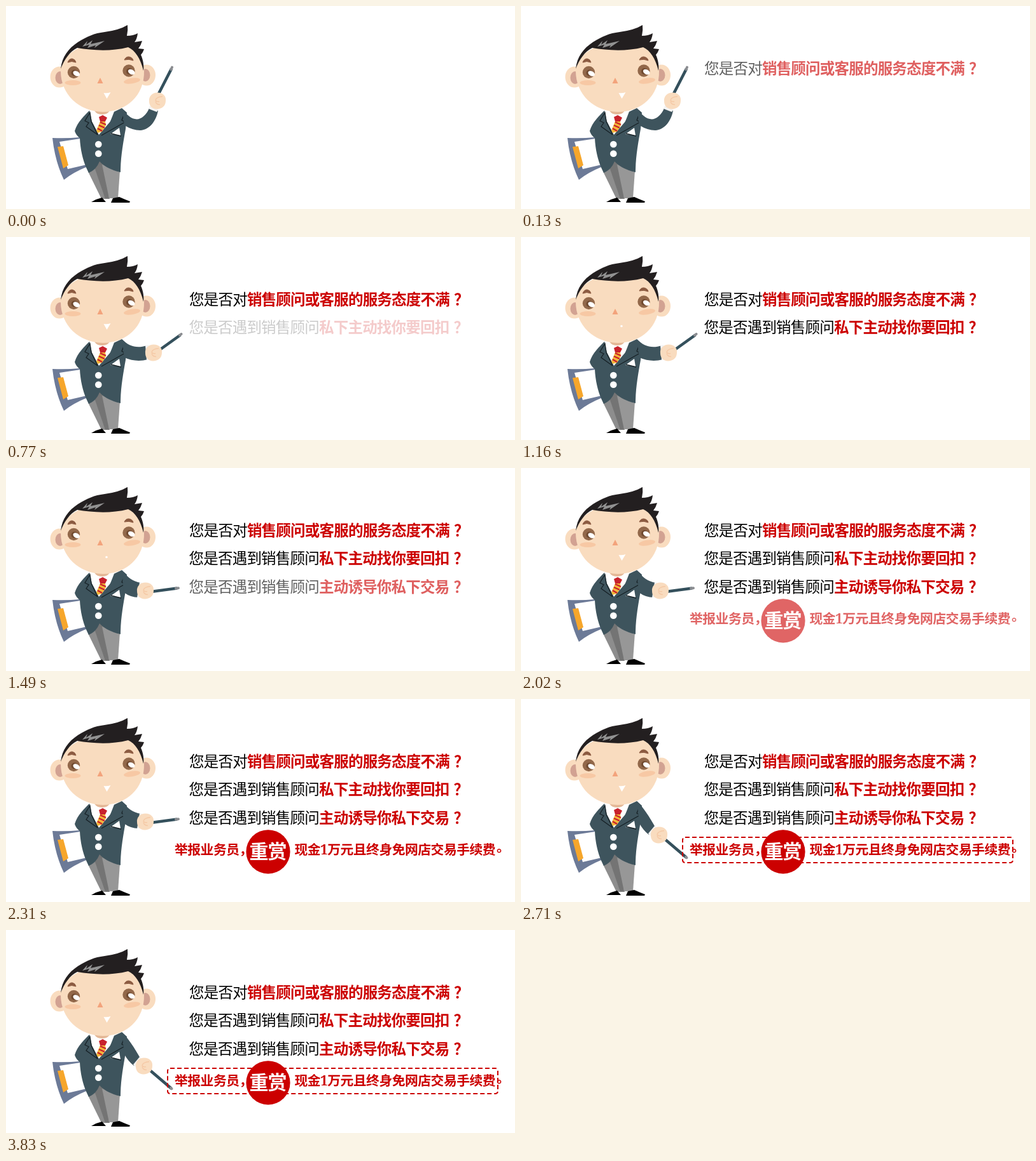
Animation of 800 by 320 pixels, one loop 4960 ms. Source, as an HTML page:

```html
<!DOCTYPE html>
<html lang="zh-CN">
<head>
<meta charset="utf-8">
<title>服务反馈</title>
<style>
html, body { margin: 0; width: 100%; height: 100%; overflow: hidden; background: #fff; }
svg { display: block; width: 800px; height: 320px; }
text { font-family: "Noto Sans CJK SC", "Noto Sans CJK", sans-serif; }
.ask { font-size: 23.5px; letter-spacing: -.78px; }
.ask tspan { font-weight: 700; fill: #c00; }
.offer { font-size: 20.8px; font-weight: 700; letter-spacing: -.5px; fill: #c00; }
.offer .num { font-family: "Noto Serif", serif; }
.big { font-size: 30px; font-weight: 900; letter-spacing: -1px; fill: #fff; }

.skin { fill: #f9dcbf; }
.suit { fill: #3e545d; }
.ink { fill: #231f20; }
.white { fill: #fff; }
.cuff { fill: #f4f4f4; }
.pen { stroke: #34505c; stroke-width: 4.6; }
.tip { stroke: #8b8d91; stroke-width: 4; stroke-linecap: round; }

.t { animation: 4960ms step-end infinite; }
.l1 { animation-name: l1; }
.l2 { animation-name: l2; }
.l3 { animation-name: l3; }
.l4 { animation-name: l4; }
.dash { animation-name: dash; }
.up { animation-name: up; }
.high { animation-name: high; }
.level { animation-name: level; }
.low { animation-name: low; }
.open { animation-name: open; }
.shut { animation-name: shut; }

/* fades run in a few hard steps */
@keyframes l1 { 0% { opacity: 0 } 1.41% { opacity: .2 } 2.01% { opacity: .4 } 2.62% { opacity: .62 } 3.22%, to { opacity: 1 } }
@keyframes l2 { 0% { opacity: 0 } 15.52% { opacity: .2 } 16.12% { opacity: .4 } 16.73% { opacity: .62 } 17.53%, to { opacity: 1 } }
@keyframes l3 { 0% { opacity: 0 } 28.82% { opacity: .2 } 29.43% { opacity: .4 } 30.04% { opacity: .62 } 30.64%, to { opacity: 1 } }
@keyframes l4 { 0% { opacity: 0 } 39.51% { opacity: .2 } 40.12% { opacity: .4 } 40.72% { opacity: .6 } 41.33% { opacity: .75 } 41.93% { opacity: .9 } 42.53%, to { opacity: 1 } }
@keyframes dash { 0% { opacity: 0 } 52.62% { opacity: .2 } 53.22% { opacity: .4 } 53.83% { opacity: .62 } 54.63%, to { opacity: 1 } }

@keyframes up { 0% { opacity: 1 } 14.91%, to { opacity: 0 } }
@keyframes high { 0% { opacity: 0 } 14.91% { opacity: 1 } 28.82%, to { opacity: 0 } }
@keyframes level { 0% { opacity: 0 } 28.82% { opacity: 1 } 52.62%, to { opacity: 0 } }
@keyframes low { 0% { opacity: 0 } 52.62%, to { opacity: 1 } }

@keyframes open {
  0%, 6.65%, 13.5%, 19.95%, 26.81%, 33.26%, 40.12%, 46.57%, 53.22%, 60.08%, 66.93%, 73.79%, to { opacity: 1 }
  3.22%, 10.08%, 16.73%, 23.38%, 30.04%, 36.69%, 43.14%, 50%, 56.65%, 63.5%, 70.36% { opacity: 0 }
}
@keyframes shut {
  0%, 6.65%, 13.5%, 19.95%, 26.81%, 33.26%, 40.12%, 46.57%, 53.22%, 60.08%, 66.93%, 73.79%, to { opacity: 0 }
  3.22%, 10.08%, 16.73%, 23.38%, 30.04%, 36.69%, 43.14%, 50%, 56.65%, 63.5%, 70.36% { opacity: 1 }
}
</style>
</head>
<body>
<svg viewBox="0 0 800 320">
  <defs>
    <g id="hand">
      <path class="skin" d="M-13 1C-14-7-8-13 0-13C9-13 14-7 13 0C13 8 7 13-1 13C-8 13-13 8-13 1Z"/>
      <path d="M8-7Q-2-6-3-1Q-2 2 3 1M-3 1Q-2 6 4 6" fill="none" stroke="#f5c9a6" stroke-width="1.3"/>
    </g>
    <g id="eye">
      <circle r="9.7" fill="#92684a"/>
      <circle cx="1" cy="1" r="5" fill="#704a30"/>
      <ellipse class="white" cx="4.2" cy="2" rx="5.6" ry="3.7" transform="rotate(28 4.2 2)"/>
    </g>
  </defs>

  <g id="board">
    <path d="M73 208Q95 209 116 207L131 252Q107 261 91 274Q77 245 73 208Z" fill="#6c7a97"/>
    <path class="white" d="M84 214L117 209L127 250L97 257Z"/>
    <path d="M81 222L90 221L98 251L90 256Z" fill="#f6a62b"/>
  </g>

  <g id="legs">
    <path d="M129 261L147 244L165 254L163 304H150Z" fill="#8d8d8d"/>
    <path d="M139 254L147 244L156 254L162 304H156Z" fill="#747474"/>
    <path d="M151 250L179 260L176 303H162Z" fill="#979797"/>
    <path d="M134 309Q142 304 151 302L157 309Z"/>
    <path d="M165 310L168 303L178 301Q187 305 195 308L194 310Z"/>
  </g>

  <g id="jacket">
    <path class="suit" d="M131 165C124 172 112 183 108 197Q110 204 116 208C117 229 122 248 130 263Q142 258 147 245Q158 257 180 262C180 239 184 216 188 194L190 168L182 161L167 168Z"/>
    <path class="white" d="M131 164H171L164 182L146 203L135 182Z"/>
    <path d="M138 160H164Q163 171 151 171Q139 171 138 160Z" fill="#e4b897"/>
    <path d="M146 175L152 172L159 176L156 182H148Z" fill="#c8222c"/>
    <path d="M148 182H156L157 188L151 198L144 200L142 196Z" fill="#f4b53a"/>
    <path d="M148 183L157 187M146 188L155 192M144 193L151 197" stroke="#c8222c" stroke-width="2.3"/>
    <path class="suit" d="M131 166L124 181L130 184L126 190L145 205L134 182Z"/>
    <path class="suit" d="M171 168L186 168L183 181L187 184L147 207L162 186Z"/>
    <path d="M132 168L124 181L130 184L126 190L144 203L134 182ZM187 167L182 180L187 183L150 204" fill="none" stroke="#172126" stroke-width="1.3"/>
    <path class="white" d="M164 202L178 192L180 204Z"/>
    <path d="M165 201L181 205" stroke="#172126" stroke-width="1.3"/>
    <circle class="white" cx="145.3" cy="218" r="5.3"/>
    <circle class="white" cx="145.3" cy="232.8" r="5.3"/>
  </g>

  <g id="head">
    <ellipse class="skin" cx="84" cy="112" rx="14.5" ry="16.5"/>
    <ellipse cx="85" cy="113" rx="7.5" ry="10" fill="#d2a292"/>
    <ellipse class="skin" cx="221" cy="109" rx="14" ry="16.5"/>
    <ellipse cx="219" cy="109" rx="7.5" ry="10" fill="#d2a292"/>
    <path class="skin" d="M86 102C88 78 112 60 151 58C192 56 215 74 217 102C218 142 188 167 152 167C115 166 86 140 86 102Z"/>
    <path class="ink" d="M86 99C88 80 98 67 113 57C128 48 138 43 155 41Q178 38 191 30Q192 38 190 47Q200 47 207 43Q206 52 202 57L214 55Q212 62 208 67L217 68Q215 74 212 77C216 86 217 95 216 102C211 82 203 70 192 65C165 72 135 70 112 66C100 72 92 84 86 99Z"/>
    <path d="M120 64L128 55L126 61L136 54L133 60L155 55L139 66L141 62L128 66L131 61Z" fill="#929292"/>
    <path d="M97 89Q99 83 104 83Q109 84 110 89Q103 86 97 89ZM186 85Q188 80 193 80Q199 81 200 86Q193 83 186 85Z" fill="#8c5b41" stroke="#8c5b41"/>
    <use href="#eye" x="106.5" y="104.5"/>
    <use href="#eye" x="193" y="102"/>
    <ellipse cx="105" cy="121" rx="12.5" ry="4" fill="#f7c8a4"/>
    <ellipse cx="198" cy="118" rx="13" ry="4.3" fill="#f7c8a4" transform="rotate(-9 198 118)"/>
    <path d="M148 113L152.5 122H143.5Z" fill="#f3a37c"/>
    <path class="white t open" d="M153.5 137Q159 138 164.5 136L158.5 146Z"/>
    <circle class="white t shut" cx="158" cy="140.5" r="1.7"/>
  </g>

  <g class="t up">
    <path class="pen" d="M239 140L260 99"/><path class="tip" d="M259.5 100L261 96.5"/>
    <path class="suit" d="M182 161C192 176 205 184 216 174Q222 169 225 161L239 165C236 181 226 195 211 196Q199 196 186 188Z"/>
    <path class="cuff" d="M226 157L240 162L237 167L224 162Z"/>
    <use href="#hand" x="238" y="149.5"/>
  </g>
  <g class="t high">
    <path class="pen" d="M240 179L274 154.5"/><path class="tip" d="M273 155L275.5 153"/>
    <path class="suit" d="M182 161C193 173 207 176 221 171L223 193Q204 198 186 190Z"/>
    <path class="cuff" d="M219 171L224 170L226 193L221 194Z"/>
    <use href="#hand" x="232" y="182.5"/>
  </g>
  <g class="t level">
    <path class="pen" d="M228 195L269 189.5"/><path class="tip" d="M267 189.8L271 189.2"/>
    <path class="suit" d="M182 161C191 172 199 179 212 181L208 204Q196 204 185 196Z"/>
    <path class="cuff" d="M210 180L214 181L210 204L206 204Z"/>
    <use href="#hand" x="219" y="193.5"/>
  </g>
  <g class="t low">
    <path class="pen" d="M225 220L260 250"/><path class="tip" d="M259 249L260.5 250.3"/>
    <path class="suit" d="M182 161C191 169 202 186 211 202L201 214Q192 207 186 196Z"/>
    <path class="cuff" d="M210 200L214 204L203 216L200 212Z"/>
    <use href="#hand" x="217" y="214.5"/>
  </g>

  <text class="ask t l1" x="288" y="106.8">您是否对<tspan>销售顾问或客服的服务态度不满<tspan dx="7">？</tspan></tspan></text>
  <text class="ask t l2" x="287.5" y="150.7">您是否遇到销售顾问<tspan>私下主动找你要回扣<tspan dx="7">？</tspan></tspan></text>
  <text class="ask t l3" x="287.5" y="196">您是否遇到销售顾问<tspan>主动诱导你私下交易<tspan dx="7">？</tspan></tspan></text>

  <rect class="t dash" x="254" y="218" width="519" height="40" rx="4" fill="none" stroke="#c00" stroke-width="2" stroke-dasharray="7 4"/>
  <g class="t l4">
    <circle cx="412" cy="240.8" r="34.6" fill="#c00"/>
    <text class="big" x="382.5" y="251">重赏</text>
    <text class="offer" x="265" y="244.5">举报业务员，</text>
    <text class="offer" x="453.5" y="244.5">现金<tspan class="num">1</tspan>万元且终身免网店交易手续费<tspan dx="2" dy="-4">。</tspan></text>
  </g>
</svg>
</body>
</html>
```
